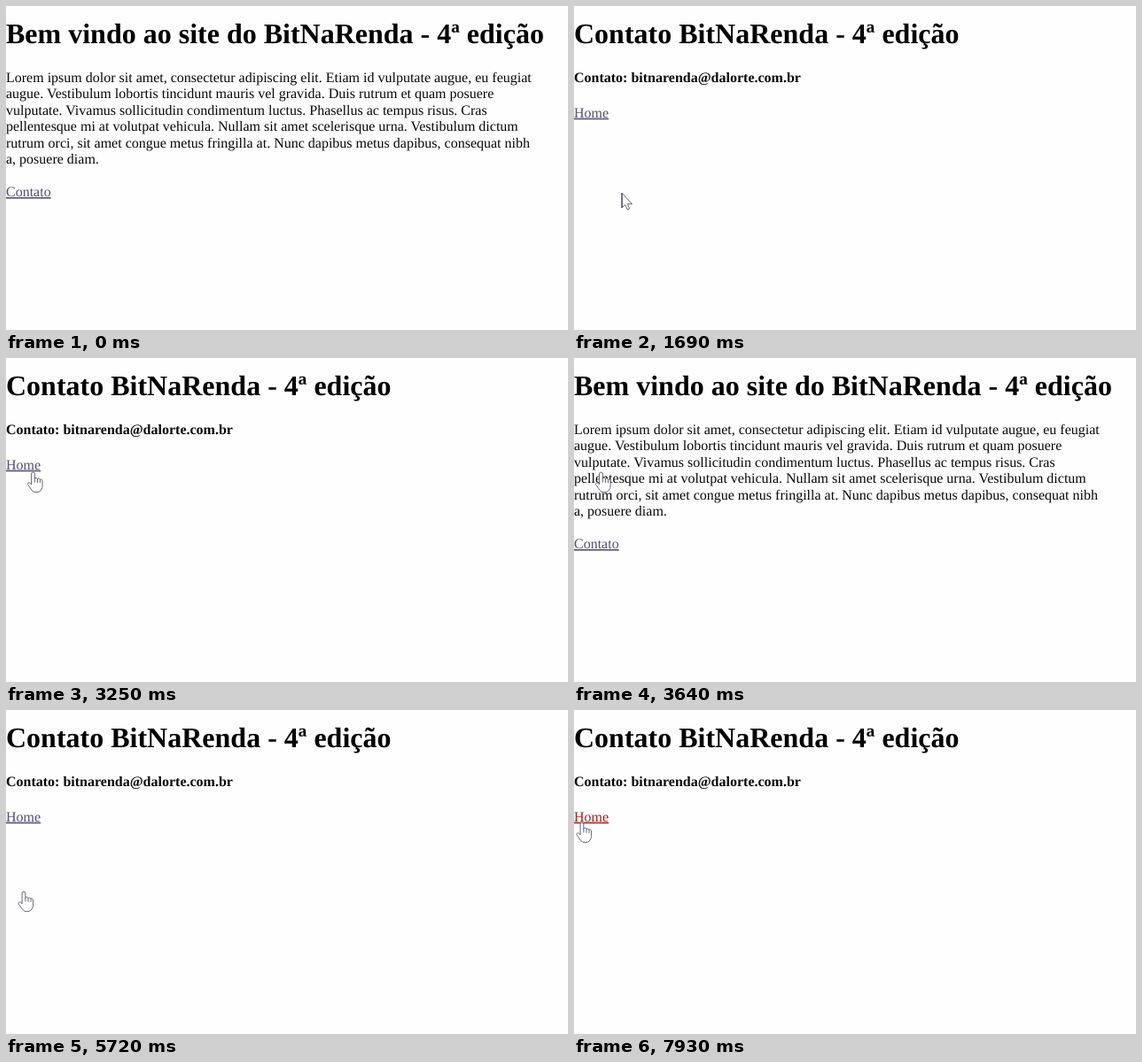
Animation, 634 px wide and 366 px high, one loop 8 s. Source, as an HTML page:

```html
<!DOCTYPE html>
<html lang="pt-BR">
<head>
<meta charset="utf-8">
<title>Contato</title>
<style>
  html, body { margin: 0; width: 100%; height: 100%; overflow: hidden; background: #fefefe; }
  svg { display: block; width: 634px; height: 366px; }
  text { font: 16px "Liberation Serif", "Times New Roman", serif; text-rendering: geometricPrecision; fill: #080808; }
  .title { font-size: 32px; font-weight: bold; fill: #000; }
  .mail { font-weight: bold; }
  .link { fill: #544e70; text-decoration: underline #403858; }
  .link.active { fill: #a3201f; text-decoration-color: #a3201f; }
  #cursor path { fill: #fefefe; stroke: #686672; stroke-linejoin: round; stroke-linecap: round; }
  #cursor .crease { fill: none; }
  #cursor .edge { stroke: #34323f; }
  [hidden] { display: none; }
</style>
</head>
<body>
<svg viewBox="0 0 634 366">
  <g id="home">
    <text class="title" y="42">Bem vindo ao site do BitNaRenda - 4ª edição</text>
    <text y="86">
      <tspan x="0">Lorem ipsum dolor sit amet, consectetur adipiscing elit. Etiam id vulputate augue, eu feugiat</tspan>
      <tspan x="0" dy="18.4">augue. Vestibulum lobortis tincidunt mauris vel gravida. Duis rutrum et quam posuere</tspan>
      <tspan x="0" dy="18.4">vulputate. Vivamus sollicitudin condimentum luctus. Phasellus ac tempus risus. Cras</tspan>
      <tspan x="0" dy="18.4">pellentesque mi at volutpat vehicula. Nullam sit amet scelerisque urna. Vestibulum dictum</tspan>
      <tspan x="0" dy="18.4">rutrum orci, sit amet congue metus fringilla at. Nunc dapibus metus dapibus, consequat nibh</tspan>
      <tspan x="0" dy="18.4">a, posuere diam.</tspan>
    </text>
    <text class="link" y="215">Contato</text>
  </g>
  <g id="contact" hidden>
    <text class="title" y="42">Contato BitNaRenda - 4ª edição</text>
    <text class="mail" y="86">Contato: bitnarenda@dalorte.com.br</text>
    <text class="link" id="back" y="125.7">Home</text>
  </g>
  <g id="cursor" hidden>
    <g id="arrow">
      <path d="M0 0V16.3L3.7 12.9 6.2 18.4 8.6 17.3 6.3 12H11Z"/>
      <path class="edge" d="M0 0V16"/>
    </g>
    <g id="hand">
      <path d="M-1.9 13.6V2a1.9 1.9 0 0 1 3.8 0V7.3C2.4 5.9 4.8 6 5 7.7C5.6 6.6 7.7 6.8 8 8.5C8.8 7.6 10.6 8 10.6 10V15.5C10.6 18.6 9 19.6 8.2 21.2Q7 22.6 3.5 22.6T-1.2 20.6L-5.6 14.4C-6.8 12.4-4.6 11-3.1 12.4Z"/>
      <path class="crease" d="M1.9 7.3V11M5 7.7V11.4M8 8.5V11.8"/>
    </g>
  </g>
</svg>
<script>
  const LOOP = 8000, STEP = 130, HOVER = 8;
  const $ = id => document.getElementById(id);
  const show = (id, on) => $(id).toggleAttribute("hidden", !on);

  const entry = { x: 150, y: 274 };
  const contactLink = { x: 41, y: 214 }, contactLinkAgain = { x: 20, y: 205 };
  const homeLink = { x: 30.5, y: 129 }, homeLinkAgain = { x: 9, y: 127 };

  // Each leg eases along a curve pulled towards `bend`
  const legs = [
    { start: 130, end: 1040, from: entry, bend: contactLink, to: contactLink },
    { start: 1560, end: 3250, from: contactLink, bend: { x: 435, y: 144 }, to: homeLink },
    { start: 4290, end: 5070, from: homeLink, bend: homeLink, to: contactLinkAgain },
    { start: 5720, end: 7670, from: contactLinkAgain, bend: { x: 240, y: 88 }, to: homeLinkAgain }
  ];
  const clicks = { contact: 1430, home: 3510, contactAgain: 5720, homeAgain: 7930 };

  const ease = k => k * k * (3 - 2 * k);
  const bezier = (a, b, c, k) => (1 - k) ** 2 * a + 2 * k * (1 - k) * b + k * k * c;

  function pointer(t) {
    const { start, end, from, bend, to } = legs.findLast(leg => t >= leg.start) || legs[0];
    const k = ease(Math.max(0, Math.min(1, (t - start) / (end - start))));
    const x = bezier(from.x, bend.x, to.x, k), y = bezier(from.y, bend.y, to.y, k);
    const near = p => p !== entry && Math.hypot(x - p.x, y - p.y) < HOVER;
    return { x, y, hand: near(from) || near(to) };
  }

  function draw(now) {
    const t = Math.floor(now % LOOP / STEP) * STEP;
    const onContact = t >= clicks.contact && t < clicks.home || t >= clicks.contactAgain;
    const { x, y, hand } = pointer(t);
    show("home", !onContact);
    show("contact", onContact);
    show("cursor", t >= legs[0].start);
    show("hand", hand);
    show("arrow", !hand);
    $("back").classList.toggle("active", t >= clicks.homeAgain);
    $("cursor").setAttribute("transform", `translate(${x} ${y})`);
  }

  const begin = performance.now();
  function tick() {
    draw(performance.now() - begin);
    requestAnimationFrame(tick);
  }
  tick();
</script>
</body>
</html>
```
